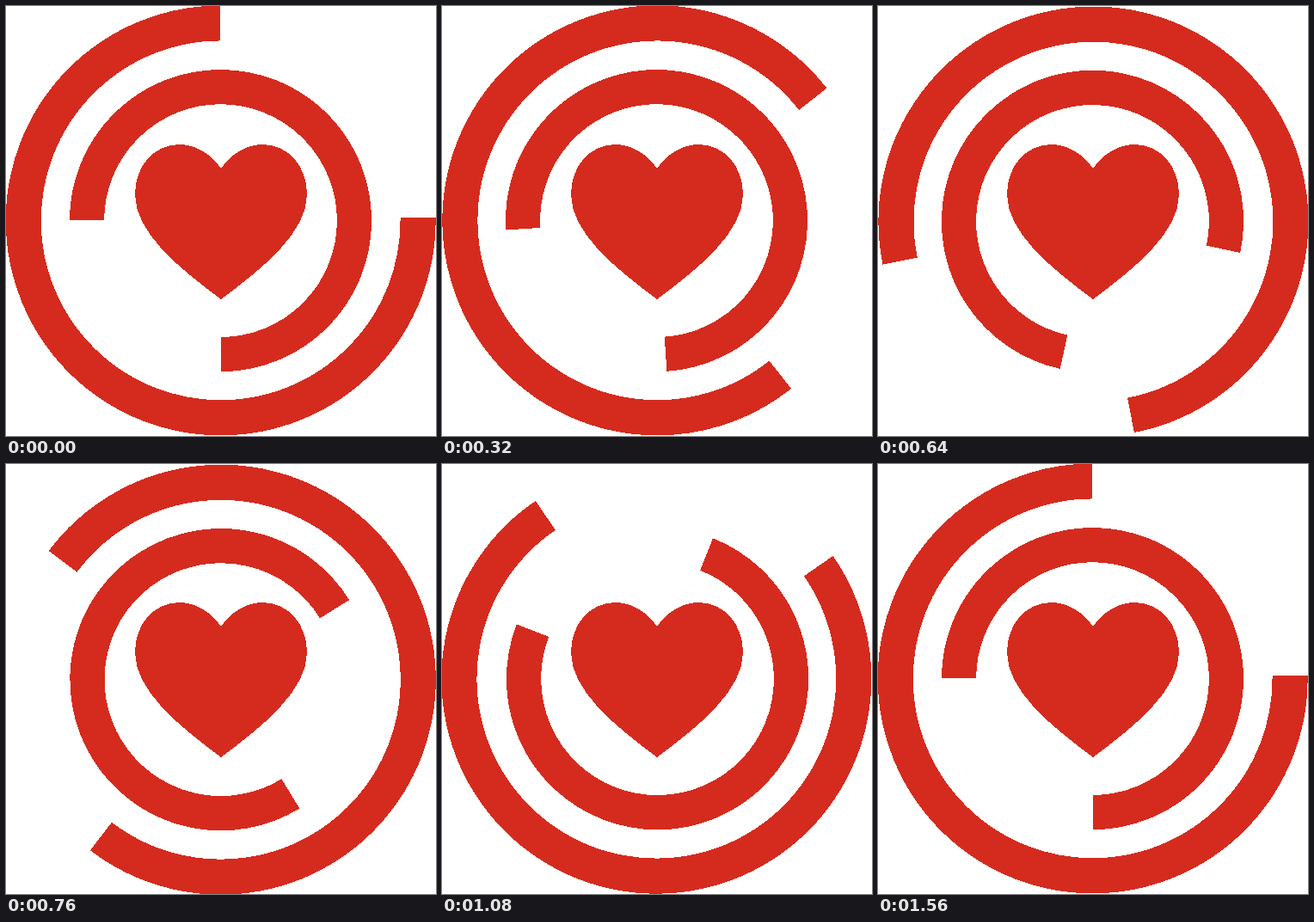
Recreate the animation shown at these times as an HTML page. Size 500x500 px, loop 1660 ms.

```html
<!DOCTYPE html>
<html lang="en">
<head>
<meta charset="utf-8">
<title>Heart loader</title>
<style>
  html, body { margin: 0; width: 100%; height: 100%; overflow: hidden; background: #fff; }
  svg { display: block; width: 500px; height: 500px; shape-rendering: crispEdges; }
  .ring { fill: none; stroke: #d52b1e; }
  .heart { fill: #d52b1e; }
</style>
</head>
<body>
<svg viewBox="0 0 500 500">
  <path id="outer" class="ring" stroke-width="41.1" d="M248.8 19.9A229.45 229.45 0 1 0 479.08 246"/>
  <path id="inner" class="ring" stroke-width="40.2" d="M94 249A155.5 155.5 0 1 1 250 405.1"/>
  <path class="heart" d="M250 189C239.4 173 221 161 202 161C172 161 150 186 150 219C150 263 200 304 250 341C300 304 350 263 350 219C350 186 328 161 298 161C279 161 260.6 173 250 189Z"/>
</svg>
<script>
  const LOOP = 1660, STEP = 40, LAST = 1560, TURN = 1333, DELAY = 240;
  const outer = document.getElementById('outer');
  const inner = document.getElementById('inner');

  const ease = x => {
    const s = Math.min(1, Math.max(0, x));
    return s * s * (3 - 2 * s);
  };
  const rotate = (el, deg) => el.setAttribute('transform', `rotate(${deg} 250 250)`);

  const start = performance.now();

  function draw() {
    const now = (performance.now() - start) % LOOP;
    // The motion advances in 40 ms steps and rests at the end of the loop.
    const t = Math.min(LAST, Math.floor(now / STEP) * STEP);
    rotate(outer, 360 * ease(t / TURN));
    rotate(inner, -360 * ease((t - DELAY) / TURN));
    requestAnimationFrame(draw);
  }
  draw();
</script>
</body>
</html>
```
